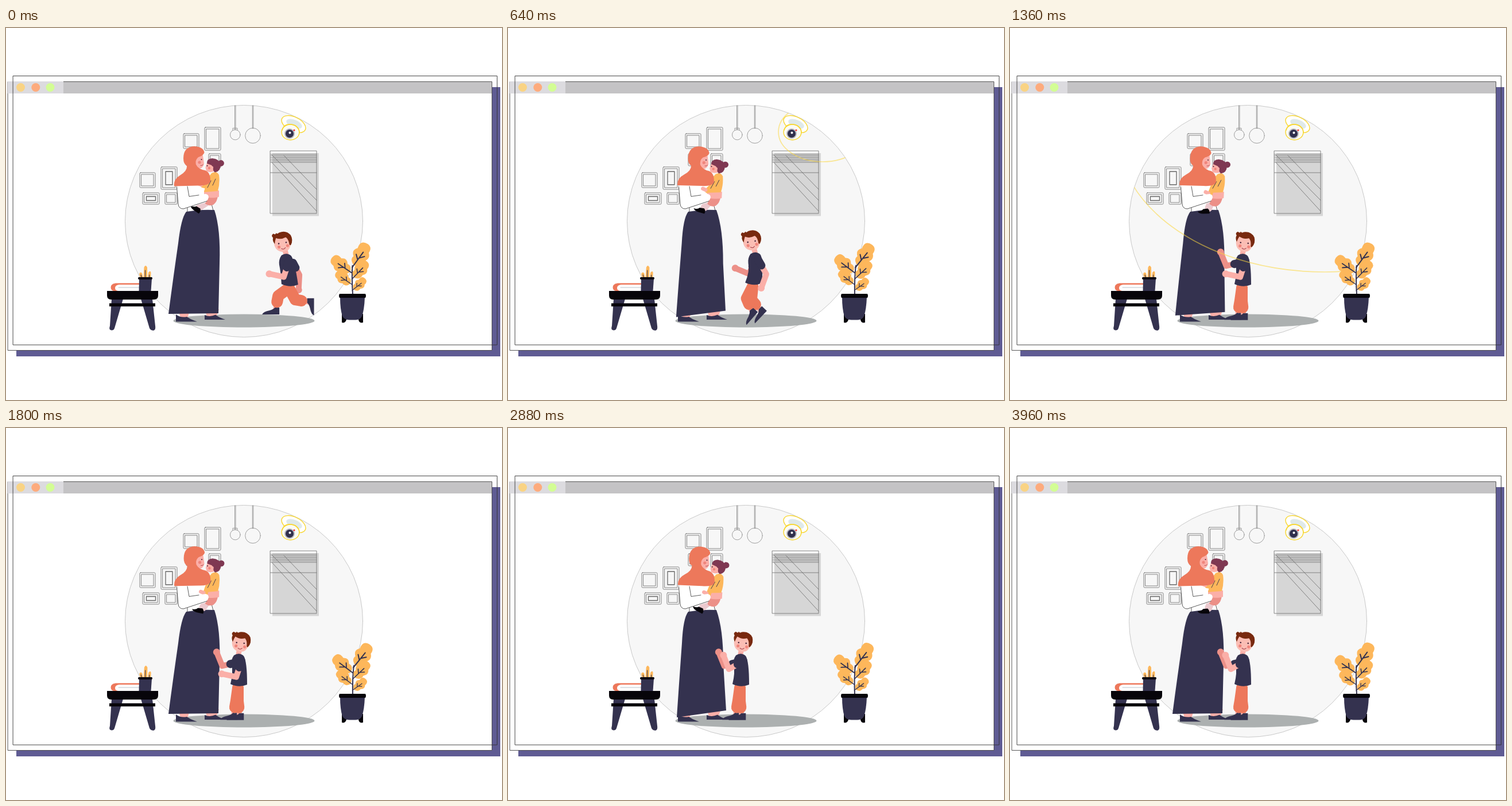
An HTML page that plays this animation: 864 by 648 pixels, repeating every 4 s.

```html
<!DOCTYPE html>
<html lang="en">
<head>
<meta charset="utf-8">
<title>Family at home</title>
<style>
  html, body { margin: 0; width: 100%; height: 100%; overflow: hidden; background: #fff; }
  svg { display: block; width: 100vw; height: 100vh; }
</style>
</head>
<body>
<svg viewBox="0 0 864 648" fill="none" stroke-linecap="round" stroke-linejoin="round">
  <defs>
    <clipPath id="room"><ellipse cx="414.5" cy="336.5" rx="207" ry="202"/></clipPath>
    <g id="leaf">
      <path fill="#fdb75b" d="M.1,0Q.18,-.25 .36,-.2Q.5,-.4 .68,-.25Q1,-.36 1.02,-.04Q1.02,.17 .78,.18Q.64,.36 .44,.22Q.18,.3 .1,0Z"/>
      <path stroke="#34324f" stroke-width=".042" d="M0,0H.68M.34,0L.47,-.16M.42,0L.58,.13"/>
    </g>
    <path id="shoe" fill="#34324f" d="M7,-6L7,6L-23,6Q-21,1 -10,-1Q-3,-3 -1,-6Z"/>
  </defs>

  <!-- browser window -->
  <path fill="#5f5b93" d="M18,103H861V572H18Z"/>
  <rect x="3.5" y="93.5" width="843" height="468" fill="#fff" stroke="#444" stroke-width=".9"/>
  <path fill="#c4c3c5" d="M3,94H846V114H3Z"/>
  <path fill="#dcdbdf" d="M3,93H100V114H3Z"/>
  <circle cx="25.5" cy="103.5" r="7.5" fill="#f9d384"/>
  <circle cx="51.8" cy="103.5" r="7.5" fill="#fdab7d"/>
  <circle cx="77" cy="103.5" r="7.5" fill="#d3fd94"/>

  <!-- room -->
  <ellipse cx="414.5" cy="336.5" rx="207" ry="202" fill="#f7f7f7" stroke="#bbb" stroke-width=".8"/>
  <g stroke="#888" stroke-width=".8">
    <path d="M398.5,135V177M400,135V177M429.3,135V175M430.8,135V175M395,178V174.5H403V178"/>
    <circle cx="399.3" cy="186" r="8.8"/>
    <circle cx="430" cy="187.5" r="13.3"/>
  </g>
  <g id="pictures" stroke="#666" stroke-width=".8"></g>
  <path fill="#d6d6d6" d="M464,218H545V327.5H464Z"/>
  <path id="blinds" stroke="#6a6a6a" stroke-width=".8"/>

  <!-- camera -->
  <g stroke="#f8d732" stroke-width="1.4">
    <ellipse cx="501" cy="167.5" rx="22.5" ry="12.5" transform="rotate(26 501 167.5)" fill="#fff"/>
    <ellipse cx="502" cy="167" rx="14.5" ry="7" transform="rotate(22 502 167)" fill="#dfe9e9" stroke="none"/>
    <ellipse cx="495.5" cy="181.5" rx="15.5" ry="13.5" fill="#fbfbf5"/>
    <path d="M481,178Q484,166 497,168Q510,170 511,182"/>
  </g>
  <circle cx="494" cy="184" r="9" fill="#b9bac0"/>
  <circle cx="494" cy="184" r="7" fill="#302f4b"/>
  <circle cx="494.5" cy="182.500" r="2" fill="#fff"/>
  <circle cx="502" cy="178" r="1.600" fill="#e33"/>

  <!-- table -->
  <path fill="#34324f" d="M184,472H204L189,523Q187,528 182,526Q179,525 181,519ZM235,472H255L260,519Q261,526 257,527Q252,527 250,523Z"/>
  <path fill="#07050a" d="M176,458H265V466Q265,473 258,473H183Q176,473 176,466ZM180,479.500H260V485H180Z"/>
  <path fill="#ed785b" d="M233,444.500H191Q182,446 182.500,452Q183,458 189,458H233Z"/>
  <path fill="#fff" d="M233,447H197Q190,448 190,453Q190,457 195,458H233Z"/>
  <path stroke="#aab4be" stroke-width=".8" d="M196,452H232"/>
  <g id="pencils">
    <path fill="#fdb75b" d="M239.500,436L240.500,417Q243,411 246,417V436ZM234,436L232,429Q233,424 237,427L239,436ZM247,436L248,426Q252,421 252.500,427L252,436Z"/>
    <path stroke="#34324f" d="M242.500,435V422M236.500,435L235,430M249.500,435V430"/>
  </g>
  <path fill="#34324f" d="M232,437H254L252.500,458H231.500Z"/>
  <path fill="#0b0912" d="M231,434H254Q256,436 254,438H231Q229,436 231,434Z"/>

  <ellipse cx="414.500" cy="510" rx="123" ry="11.500" fill="#acb0b0"/>
  <g id="people"></g>
  <ellipse id="scan" cx="548" cy="181" stroke="#fbd73f" stroke-opacity=".55" stroke-width="1.700" clip-path="url(#room)"/>

  <!-- plant -->
  <g id="plant"><path stroke="#34324f" stroke-width="2" d="M604,464Q602,435 603.500,414"/></g>
  <path fill="#07050a" d="M585,496H593V508Q591,515 585,513ZM614,508L615,498H622V513Q615,515 614,508Z"/>
  <path fill="#34324f" d="M582,469H625Q624,492 620,502Q617,508.500 609,508.500H598Q589,508 586,502Q582,490 582,469Z"/>
  <path fill="#07050a" d="M581,463H626Q628,466.500 626,470H581Q579,466.500 581,463Z"/>
  <rect x="12.500" y="83.500" width="843" height="468.500" stroke="#333" stroke-width=".9"/>
</svg>
<script>
const NAVY = '#34324f', SKIN = '#fbafa8', SHADE = '#ec9088', CORAL = '#ed785b', AMBER = '#fdb75b';
const LOOP = 4000;
const get = id => document.getElementById(id);
const fill = (color, d) => `<path fill="${color}" d="${d}"/>`;
const line = (color, width, d) => `<path stroke="${color}" stroke-width="${width}" d="${d}"/>`;
const dot = (x, y, r, color) => `<circle cx="${x}" cy="${y}" r="${r}" fill="${color}"/>`;
const clamp = v => Math.max(0, Math.min(1, v));
const mix = (a, b, k) => a + (b - a) * k;
const between = (p, q, k) => p.map((v, i) => mix(v, q[i], k));
const smooth = k => k * k * (3 - 2 * k);
const ease = (t, from, to) => smooth(clamp((t - from) / (to - from)));
const wave = (t, period) => (1 - Math.cos(2 * Math.PI * t / period)) / 2;

// Quick rise, soft fall, optional rest until the period ends.
function sway(t, period, peak, end) {
  const u = t % period;
  if (u < peak) return Math.sin(Math.PI / 2 * u / peak);
  return u < end ? (1 + Math.cos(Math.PI * (u - peak) / (end - peak))) / 2 : 0;
}

// Scenery
function picture(x, y, w, h, mat) {
  const box = (m, width) => `<rect x="${x + m}" y="${y + m}" width="${w - 2 * m}" height="${h - 2 * m}" rx="${m ? 0 : 1.5}" stroke-width="${width}"/>`;
  return box(0, .8) + box(3, .8) + (mat ? box(mat, 1.3) : '');
}
get('pictures').innerHTML =
  picture(309, 184, 27, 26) + picture(346, 173, 28, 40) + picture(353, 219, 21, 24) + picture(314, 219, 23, 21) +
  picture(233, 252, 27, 26) + picture(270, 242, 28, 39, 8) + picture(238, 287, 29, 20, 6.5) + picture(277, 287, 21, 20);

let blinds = 'M460.5,214H541V323H460.5ZM460.5,252H541M463,221L541,300M463,234L541,319M484,222L541,281';
for (let i = 0; i < 6; i++) blinds += `M460.5,${220 + 2.8 * i}H541`;
get('blinds').setAttribute('d', blinds);

// Leaves alternate right and left and shrink towards the pot.
for (let i = 0; i < 5; i++) {
  const left = i % 2, size = 48 - 4.5 * i, angle = left ? 34 : 54 - 4 * i;
  get('plant').innerHTML += `<use href="#leaf" transform="translate(603 ${417 + 10 * i}) scale(${left ? -size : size} ${size}) rotate(${-angle})"/>`;
}

function mother(t) {
  const s = sway(t, 2000, 900, 1760), lean = 4 * wave(t, 2000), kick = wave(t, 2520);
  const reach = clamp(Math.min(t / 1100, (LOOP - t) / 750));
  const left = [283 + 11 * s, 498 + 6 * s], right = [370 + 10 * s, 497 - 5 * s];
  const hand = [335 + 4 * reach, 271 + 14 * reach];
  const foot = [333 + 8 * kick, 316 + 3 * kick];

  const feet = fill(SKIN, 'M300,492H320L316,506L304,504ZM346,490H371L366,504L350,502Z') +
    fill(NAVY, 'M296,499Q304,505 315,503Q322,508 333,511.5H296ZM346,500Q355,504 365,499.5Q372,505 382,508H346Z');
  const blouse = fill('#fff', 'M297,268H352L357,300L361,319L316,321L315,313L303,315Z') +
    line('#333', .8, 'M316,312V321M357,303L361,318');
  const skirt = fill(NAVY, `M314,320Q340,315.5 363,317Q${374 + s},350 ${372 + 3 * s},410L${right}L${left}Q${292 + 7 * s},430 ${300 + 3 * s},375Q305,331 314,320Z`);

  const scarf = fill(SKIN, 'M342,217L344,229L345,236Q343,245 336,245L327,240V228Z') +
    fill(CORAL, 'M309,227Q309,207 328,206Q344,207 345.5,217Q344,222 335,225Q329,230 331,238Q335,246 347,248Q357,252 356,268Q352,275 335,274.5L293,275.5Q291,264 304,256Q316,249 315,240Q309,237 309,227Z') +
    dot(340.5, 229, 1, '#43243a') + dot(337, 234, 2.6, '#f0857c') +
    line('#a33b45', .8, 'M339,239.5Q342,240 343.5,238');
  const baby = fill(SKIN, 'M350,235L347.5,243L349,249Q355,253 363,249V238L355,233Z') +
    fill('#7f3852', 'M350,236Q349,228 359,227Q372,228 374,238Q374,250 364,251.5Q360,249 361,243L358,239Z') +
    dot(374.5, 235.5, 5.4, '#7f3852') + dot(350.5, 240, 1, '#43243a') +
    dot(354, 244, 2.2, '#f0857c') + dot(359, 243, 2.2, SKIN);
  const trunk = fill(SHADE, 'M347,292H369Q368,303 361,308Q354,311 347,306Z') +
    fill(SKIN, 'M345,283H371V294Q365,297 345,295Z') +
    fill(AMBER, 'M358,253Q367,248 371,256Q373,270 369,284L345,286Q348,265 358,253Z') +
    line(AMBER, 8.5, `M357,260L351,276L${hand[0] + 8},${hand[1] + 3}`) +
    line(SKIN, 6.5, `M${hand[0] + 5},${hand[1] + 2}L${hand}`) +
    line(NAVY, .9, 'M351,278L357,266M360,274L365,263');
  const leg = line('#ebc9ce', 13, `M350,303L${foot[0] + 5},${foot[1] - 5}`) +
    `<path fill="#07050a" transform="translate(${foot}) rotate(${30 - 38 * kick})" d="M4,-4Q8,0 6,5L-5,4Q-12,3 -14,-1Q-7,0 -4,-4Z"/>`;
  const arm = fill('#fff', 'M298,275L316,276L319,293L348,289Q355,291 352,298L348,304L309,315Q300,316 300,307Z') +
    line('#333', .8, 'M297.5,277L300,307Q301,315 309,315L350,301.5M316,276L319,293.5L336,291');

  const tilt = group => `<g transform="rotate(${lean} 325 320)">${group}</g>`;
  return feet + blouse + skirt + leg + tilt(trunk) + arm + tilt(scarf + baby);
}

// A limb end, with the angle in degrees from straight down towards the left.
function extend([x, y], angle, length) {
  const a = angle * Math.PI / 180;
  return [x - length * Math.sin(a), y + length * Math.cos(a)];
}

function arm(shoulder, upper, lower, size, skin) {
  const elbow = extend(shoulder, upper, size), hand = extend(elbow, lower, 26);
  return line(skin, 10, `M${shoulder}L${elbow}L${hand}`) + dot(...hand, 6, skin) +
    line(NAVY, 14, `M${shoulder}L${between(shoulder, elbow, .4)}`);
}

function leg(hip, thigh, shin, tilt) {
  const knee = extend(hip, thigh, 23), ankle = extend(knee, shin, 27);
  return line(SKIN, 9, `M${knee}L${ankle}`) +
    `<use href="#shoe" transform="translate(${ankle}) rotate(${tilt})"/>` +
    line(CORAL, 20, `M${hip}L${knee}L${between(knee, ankle, .4)}`);
}

function child(t) {
  const run = clamp(1 - t / 1280);                    // fades from full stride to standing
  const hop = Math.sin(Math.PI * clamp(t / 920));     // one airborne step
  const swing = t < 1300 ? wave(t + 650, 1300) ** 2 : 1;
  const turn = ease(t, 920, 1280), hug = ease(t, 1800, 2280);

  const hip = [404 + 89 * run ** 2, 453 - 3 * hop];
  const [x, y] = [hip[0] + 1 - 6 * run ** 3 + 5 * hop, hip[1] - 55];
  const face = [x + mix(-6, 4, turn), y - 25];
  const backShin = mix(10, -80, Math.sqrt(run)) + 15 * hop;

  const shirt = fill(NAVY, `M${x - 8},${y - 2}Q${x + 1},${y - 8} ${x + 9},${y - 1}Q${x + 15},${y + 8} ${hip[0] + 16},${y + 49}q-14,6 -29,-1Q${x - 9},${y + 28} ${x - 12},${y + 14}Q${x - 13},${y + 5} ${x - 8},${y - 2}Z`);
  const head = `<g transform="translate(${face}) rotate(${mix(-5, 10, turn)})">` +
    fill('#fbbdb4', 'M-14,-8Q0,-16 13,-8L14,3Q12,17 0,17Q-13,16 -15,3Z') +
    fill('#78290f', 'M-14,2Q-18,-4 -16,-9Q-20,-13 -15,-16Q-11,-13 -10,-17Q-8,-14 -5,-17Q8,-21 15,-11Q19,-2 14,6Q11,8 11,2Q10,-5 6,-8Q-3,-4 -11,-8Q-13,-4 -14,2Z') +
    dot(-7, 2, 1.3, '#43243a') + dot(6, 1, 1.3, '#43243a') +
    dot(-7, 8, 2.6, '#f0857c') + dot(8, 7, 2.6, '#f0857c') +
    line('#a33b45', 1, 'M-3,11Q1,14 4,10') + '</g>';

  return arm([x + mix(-5, 12, run ** 2), y + 11], mix(77, -28, run), mix(158, 3, 1 - Math.sin(Math.PI / 2 * (1 - run))), 24, SHADE) +
    leg(hip, mix(8, -29, run) + 20 * hop, backShin, Math.min(0, backShin) - 10 * run) +
    leg(hip, 54 * smooth(run), mix(-7, 11, run) - 30 * hop, -60 * hop) +
    line(SKIN, 9, `M${face}L${x},${y - 4}`) + shirt +
    arm([x + 5, y + 8], mix(mix(-30, 18, swing), 61, hug), mix(mix(20, 102, swing), 159, hug), 29, SKIN) + head;
}

function draw(now) {
  const t = now % LOOP;
  get('people').innerHTML = mother(t) + child(t);

  const breeze = sway(t, LOOP / 3, 560, LOOP / 3);
  get('plant').setAttribute('transform', `rotate(${2.9 * breeze} 604 463)`);
  get('pencils').setAttribute('transform', `rotate(${1.2 * breeze} 243 436)`);

  // Three scanning rings spread from the camera.
  const age = t - 96, radius = age > 0 && age < 1440 ? .8 * (age % 480) : 0;
  get('scan').setAttribute('rx', 1.48 * radius);
  get('scan').setAttribute('ry', radius);
}

const start = performance.now();
function tick() {
  draw(performance.now() - start);
  requestAnimationFrame(tick);
}
tick();
</script>
</body>
</html>
```
